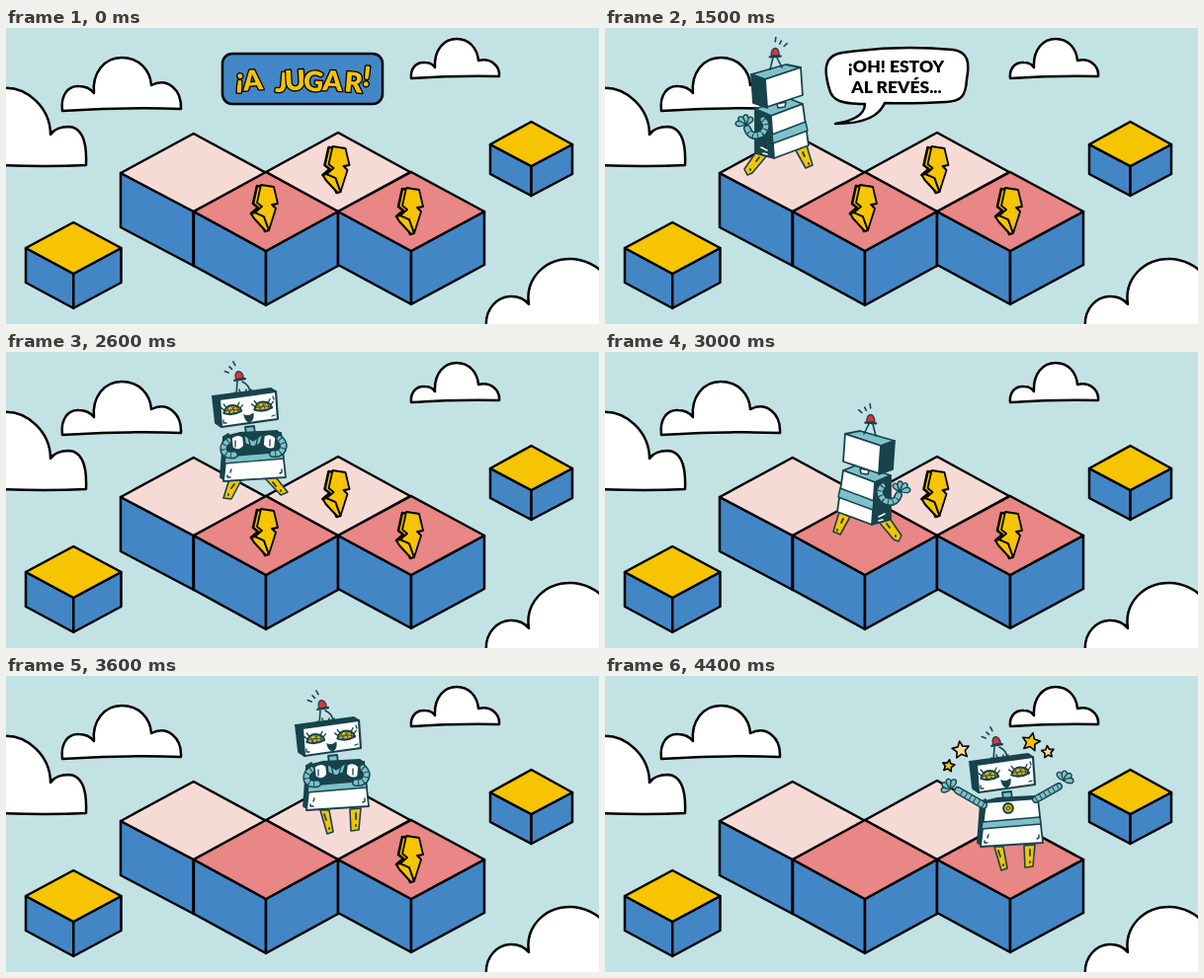
Recreate the animation shown at these times as an HTML page. Size 600x300 px, loop 5400 ms.

```html
<!DOCTYPE html>
<html lang="es">
<head>
<meta charset="utf-8">
<title>¡A jugar!</title>
<style>
html, body { margin: 0; width: 100%; height: 100%; overflow: hidden; background: #c3e2e4; }
svg { display: block; width: 100%; height: 100%; }
text { font-family: Lato, "Open Sans", sans-serif; font-weight: 900; text-anchor: middle; }
</style>
</head>
<body>
<svg id="stage" viewBox="0 0 600 300" stroke-linejoin="round" stroke-linecap="round"></svg>
<script>
const INK = '#000', BLUE = '#4386c6', YELLOW = '#f6c400', PALE = '#f6dad5', ROSE = '#e98686';
const DARK = '#17434c', TEAL = '#7dc1c9', WHITE = '#fff', RED = '#e5303c';

const path = (d, fill = 'none', stroke = INK, w = 2.5) =>
  `<path d="${d}" fill="${fill}" stroke="${stroke}" stroke-width="${w}"/>`;
const poly = (pts, fill, stroke = INK, w = 2.5) => path(`M${pts}Z`, fill, stroke, w);
const group = (content, transform) => `<g transform="${transform}">${content}</g>`;
const at = (x, y, content) => group(content, `translate(${x} ${y})`);
const part = (pts, fill, w = 1.8) => poly(pts, fill, DARK, w);
const line = (d, w = 1.5, color = DARK) => path(d, 'none', color, w);

// ---- Scenery ----
// Box with its top diamond given by left, right and centre, then the wall height.
function cube(l, r, top, mid, bottom, h, color) {
  const c = (l + r) / 2;
  return poly(`${l} ${mid} ${c} ${bottom} ${c} ${bottom + h} ${l} ${mid + h}`, BLUE) +
    poly(`${r} ${mid} ${c} ${bottom} ${c} ${bottom + h} ${r} ${mid + h}`, BLUE) +
    poly(`${l} ${mid} ${c} ${top} ${r} ${mid} ${c} ${bottom}`, color);
}

const clouds = [
  'M57 84C55 68 63 58 74 59C80 59 85 61 89 66C87 46 99 30 117 30C135 30 146 43 147 58C163 50 178 62 177 82Q118 80 57 84Z',
  'M410 51C409 41 415 34 424 35C429 35 432 37 434 40C433 22 443 11 456 11C469 11 477 21 478 33C490 30 500 38 499 49Q455 48 410 51Z',
  'M-5 61C22 58 45 82 45 108C49 102 57 100 64 100C77 101 82 116 81 139Q40 141 -5 139Z',
  'M486 304C484 284 498 272 511 272C518 272 525 275 529 280C525 254 545 234 571 234C585 234 598 241 606 250V306Z'
].map(d => path(d, WHITE)).join('');

const tiles = cube(116, 263.5, 107, 147, 186, 55, PALE) + cube(263, 409, 106, 146, 186, 55, PALE) +
  cube(190, 336, 146, 186, 226, 55, ROSE) + cube(336, 484, 146, 186, 226, 54, ROSE);
const islands = cube(20, 116.5, 197, 223, 249, 35, YELLOW) + cube(490, 573, 95, 118, 140, 30, YELLOW);

const boltFace = '-4 -23 9 -21 13 -4 7 -3 11 1 4 23 -1 9 -10 5 -3 -1 -8 -5';
const bolt = at(-4, 1, poly(boltFace, YELLOW, INK, 2.6)) + poly('-14 6 -10 5 -1 9 4 23 1 24 -11 11', YELLOW, INK, 2) +
  poly(boltFace, YELLOW, INK, 1.8);

function button() {
  const letters = [['¡', 236, 61, 4], ['A', 250.5, 63, -5], ['J', 278, 65, 5], ['U', 293, 63, -3],
    ['G', 310.5, 64, 4], ['A', 330, 63.5, 3], ['R', 351, 65, 5], ['!', 364, 59, 6]];
  return `<rect x="219" y="26" width="162" height="51" rx="10" fill="${BLUE}" stroke="${INK}" stroke-width="2.5"/>` +
    letters.map(([c, x, y, turn]) => group(
      `<text font-size="28" fill="${YELLOW}" stroke="${INK}" stroke-width="2.6" paint-order="stroke">${c}</text>`,
      `translate(${x} ${y}) rotate(${turn})`)).join('');
}

const bubble = path('M240 25Q295 17 352 22C368 24 369 36 366 52C365 70 360 74 345 75Q310 77 283 76' +
  'C277 90 262 97 233 97C252 94 263 87 263 77C240 77 230 74 227 62C222 45 220 28 240 25Z', WHITE) +
  '<text x="294.5" y="45" font-size="17.5">¡OH! ESTOY</text><text x="295" y="66" font-size="17.5">AL REVÉS...</text>';

const farCloud = path('M604 118Q594 133 604 148', WHITE);

function star(x, y, r, color, turn) {
  const pts = Array.from({ length: 10 }, (_, i) => {
    const a = (i * 36 + turn - 90) * Math.PI / 180, d = i % 2 ? r * 0.48 : r;
    return `${(x + d * Math.cos(a)).toFixed(1)} ${(y + d * Math.sin(a)).toFixed(1)}`;
  });
  return poly(pts.join(' '), color, INK, 1.6);
}
const firstStar = star(431, 67, 9.5, YELLOW, 12);
const moreStars = star(360, 75, 9, '#fbdf8d', -8) + star(347.5, 91, 6.5, YELLOW, 10) + star(448, 77, 6.5, '#fbdf8d', -6);

// ---- Robot ----
const bulb = (x, y, turn, raysTurn) => group(
  path('M-4 3C-5 -7 4 -7 4 3Z', RED, DARK, 1.3) + line('M-5.5 4H5.5', 2.2), `translate(${x} ${y}) rotate(${turn})`) +
  group(line('M-5 -10L-6.5 -14M0 -10V-13.5M5 -10L6.5 -14', 1.6), `translate(${x} ${y}) rotate(${raysTurn})`);

const leg = (pts, dots) => part(pts, YELLOW, 1.6) + line(dots, 1.8);

const eye = (x, y) => group(
  path('M-9 2Q-6 -6 1 -5Q8 -4 9 2Q0 6 -9 2Z', '#d9b21c', DARK, 2) +
  line('M-5 -3L-2 4M0 -5L2 4M5 -4L6 3M-7 0Q0 -2 8 1M-5 3L4 -4', 0.8) +
  line('M-8 -1L-11 -4M-6 -4L-8 -7M8 -1L11 -4M6 -4L8 -7', 1.3), `translate(${x} ${y}) rotate(-7)`);

const hand = (x, y, turn) => group([-70, -28, 14, 56].map(a =>
  group(path('M0 0C-4 -5 -3 -10 0 -10C3 -10 4 -5 0 0Z', TEAL, DARK, 1.3), `rotate(${a})`)).join(''),
  `translate(${x} ${y}) rotate(${turn})`);

// Jointed tube: outline, fill, then rings.
const tube = d => line(d, 8) + line(d, 5, TEAL) +
  `<path d="${d}" fill="none" stroke="${DARK}" stroke-width="5" stroke-dasharray="1 4" stroke-linecap="butt"/>`;

const frontArms = {
  folded: tube('M309 95C301 101 303 111 315 109') + tube('M361 93C368 100 364 109 354 108') +
    path('M312 92Q318 87 324 91L325 100Q320 107 313 102Z', WHITE, DARK, 1.6) +
    path('M345 90Q352 86 357 92L356 102Q349 106 344 99Z', WHITE, DARK, 1.6) +
    path('M325 89L334 95L344 88L341 98L334 101L326 98Z', TEAL, DARK, 1.4) +
    line('M329 91L331 99M339 91L337 99M316 95V101M351 94V100', 1.3),
  half: tube('M307 95Q297 103 288 98') + hand(281, 95, -70) + tube('M360 91Q371 99 380 92') + hand(387, 88, 65),
  up: tube('M307 94L281 79') + hand(274, 77, -32) + tube('M360 88L383 75') + hand(388, 69, 35)
};
const badge = `<circle cx="332" cy="97" r="4.8" fill="${YELLOW}" stroke="${DARK}" stroke-width="2.2"/>` +
  `<circle cx="332" cy="97" r="1.8" fill="none" stroke="${DARK}"/>`;

const frontLegs = {
  straight: leg('318 136 327 136 331 158 325 160', 'M322 140L324 146M327 154V155') +
    leg('348 135 359 134 357 156 349 157', 'M354 139V145M354 151V152'),
  spread: leg('310 134 322 135 312 154 304 153', 'M315 139L312 143M309 149V150') +
    leg('346 133 357 132 369 147 362 150', 'M354 137L357 141M362 145V146')
};

function front(legs, arms) {
  return frontLegs[legs] +
    part('326 81 335 80 336 88 327 88', TEAL) +
    part('304 91 309 88 306 135 301 132', DARK) + part('304 91 320 87 358 85 362 88 309 92', DARK) +
    part('309 91 362 87 367 132 304 136', WHITE) +
    (arms === 'folded' ? part('309 91 362 87 364 107 306 111', DARK) : '') +
    part('306 111 364 106 365 113 305 118', TEAL, 1.4) +
    line('M308 130V132H311M361 128L363 127V124M312 124L311 127', 1.4) +
    (arms === 'folded' ? '' : badge) + frontArms[arms] +
    line('M318 35L317 49M323 35Q330 38 331 46', 1.6) +
    part('293 50 300 53 302 81 296 77', DARK) + part('293 50 352 42 357 45 300 53', DARK) +
    part('300 53 357 45 359 73 302 81', WHITE, 2.2) +
    line('M315 46L319 50M320 43L322 49M327 43L326 49M332 43L329 48', 1.5) +
    line('M304 74V77H307M354 50L355 53M353 70L356 69', 1.3) +
    eye(313, 64) + eye(344, 60.5) +
    path('M325 69Q330 71 334 67Q335 75 330 76Q326 75 325 69Z', DARK, DARK, 1) +
    bulb(320, 29, -9, -48);
}

const side = leg('269 119 280 124 270 142 263 139', 'M273 126L271 130M267 137V138') +
  leg('309 129 319 124 332 143 329 149 324 147', 'M317 131L320 135M326 143V144') +
  part('273 77 288 71 321 82 305 89', TEAL) +
  part('305 89 321 82 321 127 302 132', DARK) +
  part('273 77 305 89 302 132 267 119', WHITE) +
  part('270 95 304 108 303 117 268 104', TEAL, 1.4) +
  line('M309 124L315 121M309 128L313 127', 1.6, WHITE) +
  tube('M313 93Q307 99 314 107Q325 113 329 102') + hand(331, 98, 25) +
  part('290 75 299 77 298 81 291 80', WHITE, 1.5) +
  part('275 40 290 37 325 47 311 52', TEAL) +
  part('311 52 325 47 323 76 309 81', DARK) +
  part('275 40 311 52 309 80 273 68', WHITE) +
  line('M299 30L294 40M303 30L306 42', 1.6) + bulb(301, 25, 4, -28);

const back = leg('171 135 180 134 182 155 176 157', 'M175 139L176 146M179 152V153') +
  leg('199 132 210 130 209 152 200 154', 'M205 136V143M205 148V149') +
  path('M158 89C146 92 146 106 157 109Z', TEAL, DARK, 1.8) + path('M211 86C218 90 216 100 213 102Z', TEAL, DARK, 1.8) +
  line('M150 94L157 97M149 100L157 103', 1.4) +
  part('175 77 186 75 187 83 176 84', DARK) +
  part('160 86 209 80 214 83 218 130 156 135', WHITE, 2.2) +
  part('160 111 216 104 217 113 159 119', TEAL, 1.4) +
  line('M160 86L213 83M162 128V131H166M211 123V127M164 92V97M207 124L212 122', 1.5) +
  line('M174 31L169 47M179 31Q185 37 184 44M174 40L173 46M179 40L180 45', 1.6) +
  path('M149 50L202 41Q206 40 207 44L210 69Q210 73 206 74L155 78Q151 78 150 74L146 54Q145 50 149 50Z', WHITE, DARK, 2.4) +
  line('M149 49L158 46L200 40M207 46L209 62M151 70L154 74', 2.6) +
  bulb(176.5, 24, -4, 18);

// ---- Timeline ----
const hop = (x, y) => at(x, y, front('spread', 'folded'));
const stand = (x, y, arms = 'folded') => at(x, y, front('straight', arms));
const turned = (x, y) => at(x, y, side);

// Start time, bolts already collected, content.
const steps = [
  [0, 0, button()],
  [1000, 0, farCloud + bubble + back],
  [1500, 0, bubble + group(side, 'translate(473 0) scale(-1 1)')],
  [2000, 0, turned(-113, -4)],
  [2200, 0, stand(-147, 1)],
  [2600, 0, hop(-84, -5)],
  [2800, 1, stand(-75, 37)],
  [3000, 1, turned(-32, 43)],
  [3200, 1, turned(0, 0)],
  [3400, 2, turned(41, 3)],
  [3600, 2, stand(0, 0)],
  [3800, 2, hop(58, -5)],
  [4000, 3, stand(76, 37)],
  [4200, 3, stand(76, 37, 'half') + firstStar],
  [4400, 3, stand(76, 37, 'up') + firstStar + moreStars]
];
const LOOP = 5400;
const boltSpots = [[262, 182], [334.5, 143], [409, 185]];

const stage = document.getElementById('stage');
stage.innerHTML = `<rect width="600" height="300" fill="#c3e2e4"/>${clouds}${islands}${tiles}<g id="actors"></g>`;
const actors = document.getElementById('actors');
let shown = null;

function draw(time) {
  const step = steps.findLast(s => s[0] <= time % LOOP);
  if (step === shown) return;
  shown = step;
  actors.innerHTML = boltSpots.slice(step[1]).map(([x, y]) => at(x, y, bolt)).join('') + step[2];
}

const start = performance.now();
function tick() {
  draw(performance.now() - start);
  requestAnimationFrame(tick);
}
tick();
</script>
</body>
</html>
```
